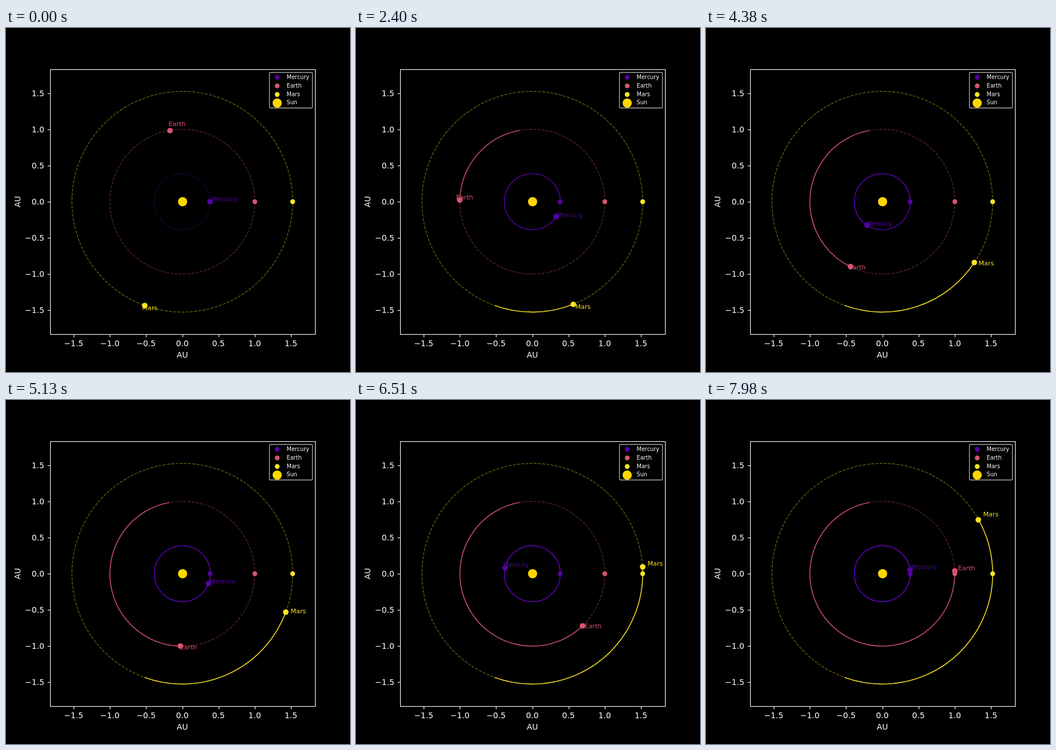
Write an HTML page with a canvas that moves like this. It is 600 px wide and 600 px high and loops after 8000 ms.

```html
<!DOCTYPE html>
<html lang="en">
<head>
<meta charset="utf-8">
<title>Planet orbits</title>
<style>
  html, body { margin: 0; width: 100%; height: 100%; overflow: hidden; background: #000; }
  canvas { display: block; width: 600px; height: 600px; }
</style>
</head>
<body>
<canvas id="stage" width="600" height="600"></canvas>
<script>
const ctx = document.getElementById('stage').getContext('2d');
const LOOP = 8000, STEP = 30, TAU = 2 * Math.PI;
const CX = 307.5, CY = 303, AU = 462 / (2 * 1.2 * 1.524);
const PT = 100 / 72; // one point in pixels
const GOLD = '#ffd700';

// radius in AU, period in days, starting angle in degrees
const planets = [
  { name: 'Mercury', radius: 0.387, period: 88, start: 0, color: '#5502a3' },
  { name: 'Earth', radius: 1, period: 365.25, start: 100, color: '#d6556d' },
  { name: 'Mars', radius: 1.524, period: 687, start: 250, color: '#fae524' },
];

function dot(x, y, r, color) {
  ctx.fillStyle = color;
  ctx.beginPath();
  ctx.arc(Math.round(x), Math.round(y), r, 0, TAU);
  ctx.fill();
}

function text(str, x, y, size, color = '#fff', align = 'left') {
  ctx.font = `${size * PT}px "DejaVu Sans", sans-serif`;
  ctx.fillStyle = color;
  ctx.textAlign = align;
  ctx.fillText(str, x, y);
}

function line(x1, y1, x2, y2) {
  ctx.beginPath();
  ctx.moveTo(x1, y1);
  ctx.lineTo(x2, y2);
  ctx.stroke();
}

// Counter-clockwise arc around the sun, angles in radians
function arc(radius, from, to, color) {
  ctx.strokeStyle = color;
  ctx.lineWidth = PT;
  ctx.beginPath();
  ctx.arc(CX, CY, radius * AU, -from, -to, true);
  ctx.stroke();
}

function drawAxes() {
  ctx.strokeStyle = '#fff';
  ctx.lineWidth = 0.8 * PT;
  ctx.strokeRect(77.5, 72.5, 462, 462);
  for (let v = -1.5; v <= 1.5; v += 0.5) {
    const label = v.toFixed(1).replace('-', '\u2212');
    const x = CX + v * AU, y = CY - v * AU;
    const tickX = Math.round(x) + 0.5, tickY = Math.round(y) + 0.5;
    line(tickX, 534.5, tickX, 539.4);
    line(77.5, tickY, 72.6, tickY);
    text(label, x, 555, 10, '#fff', 'center');
    text(label, 66.8, Math.round(y + 5), 10, '#fff', 'right');
  }
  text('AU', CX, 574.5, 10, '#fff', 'center');
  ctx.save();
  ctx.translate(24.5, CY);
  ctx.rotate(-Math.PI / 2);
  text('AU', 0, 0, 10, '#fff', 'center');
  ctx.restore();
}

function drawLegend() {
  ctx.strokeStyle = '#a8a8a8';
  ctx.lineWidth = PT;
  ctx.beginPath();
  ctx.roundRect(459.5, 77.5, 75, 62, 2);
  ctx.stroke();
  [...planets, { name: 'Sun', color: GOLD }].forEach(({ name, color }, i) => {
    const y = 86.4 + 14.7 * i;
    dot(473, y, name === 'Sun' ? 8 : 4.15, color);
    text(name, 489.5, Math.round(y + 2.9), 7);
  });
}

function drawOrbit({ radius, color }) {
  dot(CX + radius * AU, CY, 4.15, color);
  ctx.save();
  ctx.globalAlpha = 0.4;
  ctx.setLineDash([3.7 * PT, 1.6 * PT]);
  arc(radius, 0, TAU, color);
  ctx.restore();
}

function drawPlanet({ name, radius, period, start, color }, day) {
  const from = start * TAU / 360, angle = from + day * TAU / period;
  // One stroke per revolution, so repeated laps look slightly bolder
  for (let a = from; a < angle; a += TAU) arc(radius, a, Math.min(a + TAU, angle), color);
  const dx = radius * AU * Math.cos(angle), dy = radius * AU * Math.sin(angle);
  dot(CX + dx, CY - dy, 4.86, color);
  text(name, Math.round(CX + 1.05 * dx) - 0.5, Math.round(CY - 1.05 * dy) - 1, 8, color);
}

function draw(now) {
  const day = Math.floor((now % LOOP) / STEP);
  ctx.fillStyle = '#000';
  ctx.fillRect(0, 0, 600, 600);
  planets.forEach(drawOrbit);
  dot(CX, CY, 8, GOLD);
  planets.forEach(p => drawPlanet(p, day));
  drawAxes();
  drawLegend();
}

const begin = performance.now();
function tick() {
  draw(performance.now() - begin);
  requestAnimationFrame(tick);
}
tick();
</script>
</body>
</html>
```
